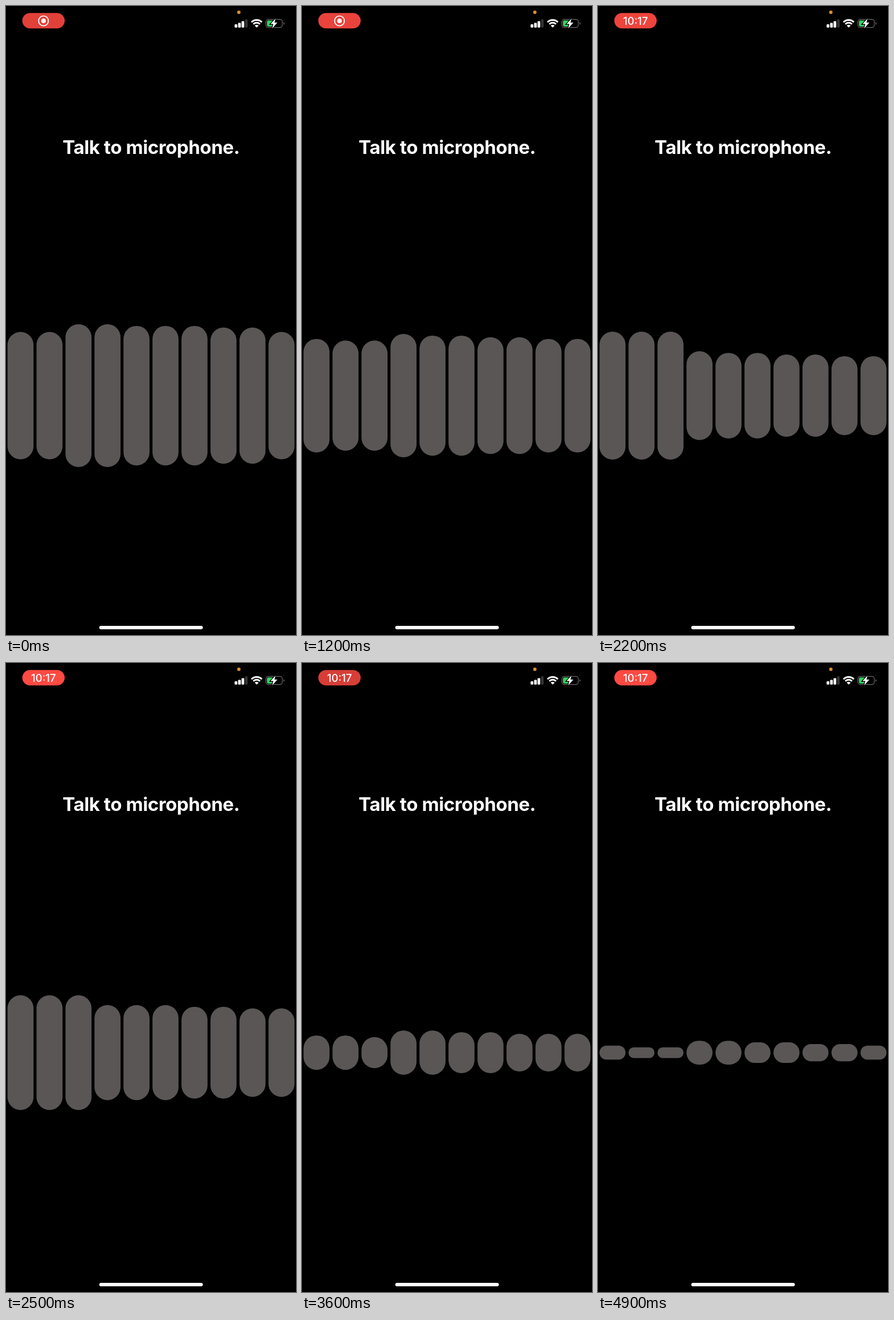
An HTML page for the animation above (5000 ms loop, 509 by 1101 pixels).

```html
<!DOCTYPE html>
<html lang="en">
<head>
<meta charset="utf-8">
<title>Microphone level</title>
<style>
  html, body { margin: 0; width: 100%; height: 100%; overflow: hidden; background: #000; }
  svg { display: block; }
  text { font-family: Inter, sans-serif; text-anchor: middle; fill: #fff; }
</style>
</head>
<body>
<svg width="509" height="1101" viewBox="0 0 509 1101" fill="#fff">
  <rect id="pill" x="28.6" y="12.2" width="74.4" height="27.1" rx="13.5" fill="#ff4a42"/>
  <g id="record">
    <circle cx="65.8" cy="26" r="8.6" fill="none" stroke="#fff" stroke-width="1.8"/>
    <circle cx="65.8" cy="26" r="4.1"/>
  </g>
  <text id="clock" x="65.8" y="32.6" font-size="18.5" font-weight="500">10:17</text>

  <circle cx="408.7" cy="11" r="3" fill="#d9902f"/>
  <g id="signal">
    <rect x="401.3" y="32" width="4.7" height="5.8" rx="1.2"/>
    <rect x="407.4" y="29.5" width="4.7" height="8.3" rx="1.2"/>
    <rect x="413.4" y="26.5" width="4.7" height="11.3" rx="1.2"/>
    <rect x="419.4" y="23.2" width="4.7" height="14.6" rx="1.2" fill="#343436"/>
  </g>
  <g id="wifi">
    <path d="M430.8 28.3A13 13 0 0 1 449.2 28.3M434.1 31.7A8.3 8.3 0 0 1 445.9 31.7"
          fill="none" stroke="#fff" stroke-width="2.9"/>
    <path d="M440 37.8L436.6 34.4A4.8 4.8 0 0 1 443.4 34.4Z"/>
  </g>
  <g id="battery">
    <rect x="456.2" y="23.4" width="28.8" height="14.3" rx="4.2" fill="none" stroke="#6a6a6c" stroke-width="1.2"/>
    <path d="M487 28.2A2.6 2.6 0 0 1 487 33Z" fill="#6a6a6c"/>
    <rect x="458" y="25.2" width="11.5" height="10.7" rx="2.4" fill="#35d05a"/>
    <path d="M473.2 21.8L464.4 31.6H469.2L467.2 39.2L476.2 29H471.2Z"
          stroke="#000" stroke-width="2.6" paint-order="stroke"/>
  </g>

  <text x="254.7" y="258.6" font-size="33" font-weight="700" letter-spacing="-0.4">Talk to microphone.</text>
  <g id="bars" fill="#5a5656"></g>
  <rect x="163.7" y="1084.9" width="181.8" height="6.1" rx="3"/>
</svg>
<script>
const LOOP = 5000, STEP = 100, SAMPLE = 10, COUNT = 10;
const TICK = 23, DECAY = 0.25, FLOOR = 12;
const PITCH = 50.9, BAR_W = 45.7, MID_Y = 682;
const $ = id => document.getElementById(id);

// Spoken syllables: [start ms, peak height].
const syllables = [
  [-95, 250], [-20, 223], [960, 190], [1090, 216], [1950, 190], [2180, 224],
  [2480, 201], [2760, 222], [3090, 181], [3840, 180], [4085, 220]
];

// The meter jumps to each peak, then falls at a steady rate in small ticks.
function level(t) {
  const [start, peak] = syllables.findLast(s => s[0] <= t);
  const held = Math.floor((t - start) / TICK) * TICK;
  return Math.max(FLOOR, peak - DECAY * held);
}

const bars = Array.from({ length: COUNT }, (_, i) => {
  const bar = document.createElementNS("http://www.w3.org/2000/svg", "rect");
  bar.setAttribute("x", (PITCH - BAR_W) / 2 + PITCH * i);
  bar.setAttribute("width", BAR_W);
  return $("bars").appendChild(bar);
});

function setHeight(bar, h) {
  bar.setAttribute("y", MID_Y - h / 2);
  bar.setAttribute("height", h);
  bar.setAttribute("rx", Math.min(BAR_W, h) / 2);
}

const clamp = v => Math.min(1, Math.max(0, v));

function draw(t) {
  // The bars are a ring buffer of the last samples; its head slips one place after the start.
  const oldest = Math.min(3, 2 + t / STEP);
  for (let j = 0; j < COUNT; j++) {
    setHeight(bars[(oldest + j) % COUNT], level(t - (COUNT - 1 - j) * SAMPLE));
  }
  const pulse = Math.cos((t - 650) / 2050 * 2 * Math.PI);
  $("pill").setAttribute("opacity", clamp(0.925 + 0.09 * pulse));
  const fade = clamp((t - 1750) / 400);
  $("clock").setAttribute("opacity", fade);
  $("record").setAttribute("opacity", clamp(2 - 2 * fade));
}

function frame() {
  draw(Math.floor(performance.now() % LOOP / STEP) * STEP);
  requestAnimationFrame(frame);
}
frame();
</script>
</body>
</html>
```
